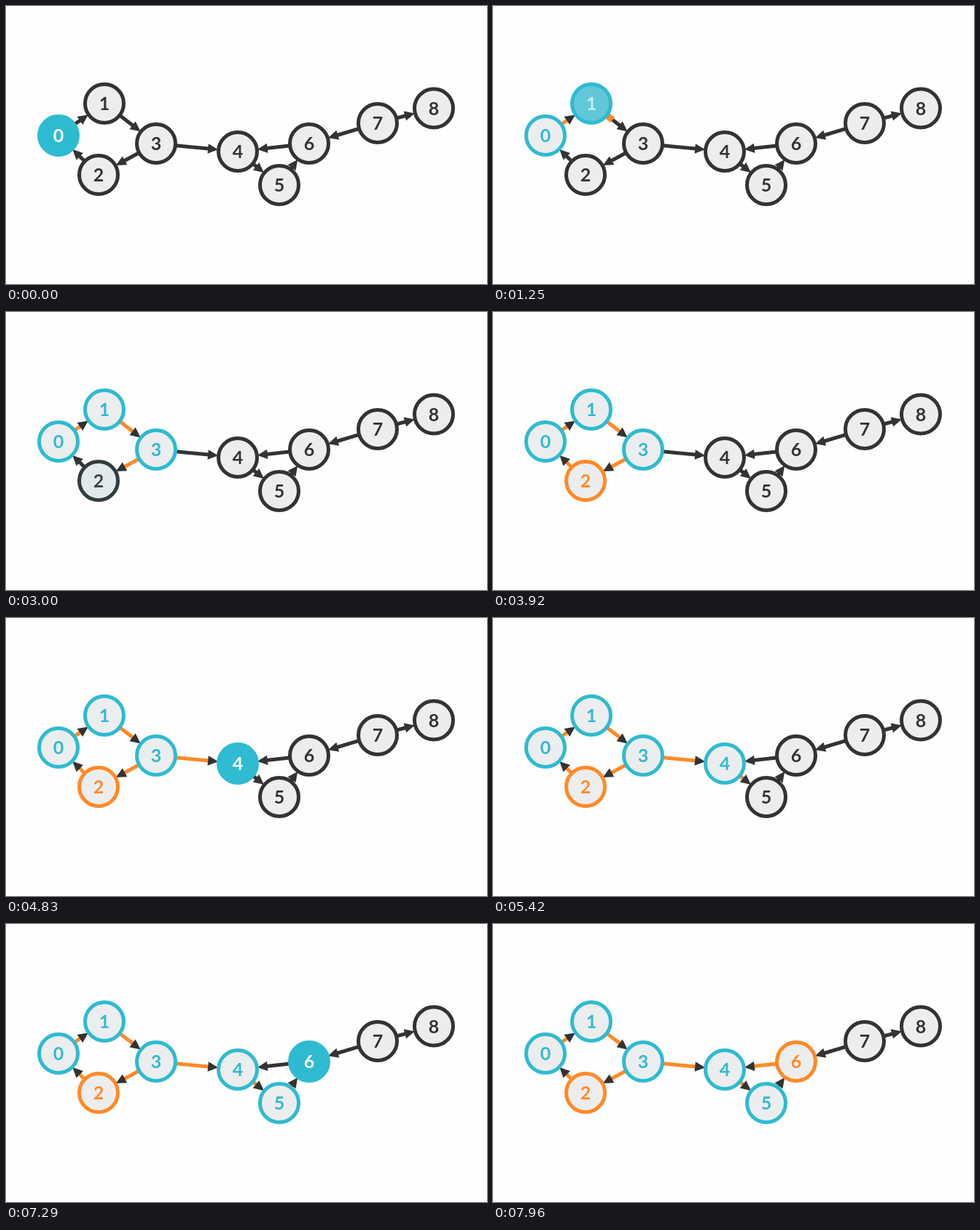
Animation, 660 px wide and 382 px high, one loop 8000 ms. Source, as an HTML page:

```html
<!DOCTYPE html>
<html lang="en">
<head>
<meta charset="utf-8">
<title>Depth-first search on a directed graph</title>
<style>
  html, body { margin: 0; width: 100%; height: 100%; overflow: hidden; background: #fefefe; }
  svg { display: block; width: 660px; height: 382px; }
  circle { stroke-width: 5; }
  text { font: 700 25px Lato, "Open Sans", sans-serif; text-anchor: middle; }
</style>
</head>
<body>
<svg id="stage" viewBox="0 0 660 382"></svg>
<script>
const LOOP = 8000, FADE = 300, RADIUS = 28;
const DARK = [51, 51, 51], ORANGE = [255, 138, 39], CYAN = [46, 187, 209];
const GREY = [236, 237, 238], WHITE = [255, 255, 255];

const STYLES = {
  idle:   { stroke: DARK,   fill: GREY, text: DARK },
  active: { stroke: CYAN,   fill: CYAN, text: WHITE },
  seen:   { stroke: CYAN,   fill: GREY, text: CYAN },
  done:   { stroke: ORANGE, fill: GREY, text: ORANGE }
};

const POINTS = [[72, 178], [135, 134], [127, 232], [206, 189], [318, 200],
                [375, 246], [416, 189], [510, 161], [587, 140.5]];
const LINKS = ['01', '13', '32', '20', '34', '45', '56', '64', '76', '78'];

// start time, vertex, its new style, edge followed at the same moment
const STEPS = [
  [30, 0, 'seen', '01'], [580, 1, 'active'],
  [1130, 1, 'seen', '13'], [1730, 3, 'active'],
  [2330, 3, 'seen', '32'], [2925, 2, 'active'],
  [3470, 2, 'done', '20'], [4015, 3, 'seen', '34'],
  [4560, 4, 'active'], [5110, 4, 'seen', '45'],
  [5670, 5, 'active'], [6230, 5, 'seen', '56'],
  [6800, 6, 'active'], [7370, 6, 'done', '64']
];

const stage = document.getElementById('stage');
const rgb = c => `rgb(${c.map(Math.round)})`;
const mix = (a, b, k) => a.map((v, i) => v + (b[i] - v) * k);
const ease = p => p < 0.5 ? 4 * p ** 3 : 1 - 4 * (1 - p) ** 3;
const progress = (time, start) => Math.min(1, Math.max(0, (time - start) / FADE));

function set(el, attrs) {
  for (const key in attrs) el.setAttribute(key, attrs[key]);
}

function add(tag, attrs) {
  const el = document.createElementNS('http://www.w3.org/2000/svg', tag);
  set(el, attrs);
  return stage.appendChild(el);
}

function makeEdge(id) {
  const [from, to] = [...id].map(n => POINTS[n]);
  const dx = to[0] - from[0], dy = to[1] - from[1];
  const length = Math.hypot(dx, dy), angle = Math.atan2(dy, dx) * 180 / Math.PI;
  const transform = `translate(${from}) rotate(${angle})`;
  const tip = length - RADIUS + 1;
  const line = add('path', { transform, d: `M20 0H${tip - 8}`, 'stroke-width': 5 });
  add('path', { transform, d: `M${tip} 0l-14 -6.7v13.4z`, fill: rgb(DARK) });
  const trace = add('path', { transform, stroke: rgb(ORANGE), 'stroke-width': 9 });
  const step = STEPS.find(s => s[3] === id);
  return { line, trace, span: length - 2 * RADIUS, start: step ? step[0] : Infinity };
}

function makeVertex([x, y], index) {
  const circle = add('circle', { cx: x, cy: y, r: 26.5 });
  const label = add('text', { x, y: y + 9 });
  label.textContent = index;
  return {
    circle, label,
    first: index ? 'idle' : 'active',
    steps: STEPS.filter(s => s[1] === index)
  };
}

const edges = LINKS.map(makeEdge);
const vertices = POINTS.map(makeVertex);

function drawEdge({ line, trace, span, start }, time) {
  const p = progress(time, start);
  const moving = p > 0 && p < 1;
  set(line, { stroke: rgb(p === 1 ? ORANGE : DARK) });
  set(trace, {
    d: `M${RADIUS - 2} 0H${RADIUS + span * ease(p)}`,
    visibility: moving ? 'visible' : 'hidden'
  });
}

function drawVertex({ circle, label, first, steps }, time) {
  let style = STYLES[first];
  for (const [start, , name] of steps) {
    const k = ease(progress(time, start)), next = STYLES[name], last = style;
    style = {};
    for (const key in next) style[key] = mix(last[key], next[key], k);
  }
  set(circle, { stroke: rgb(style.stroke), fill: rgb(style.fill) });
  set(label, { fill: rgb(style.text) });
}

const origin = performance.now();
function frame() {
  const time = (performance.now() - origin) % LOOP;
  edges.forEach(edge => drawEdge(edge, time));
  vertices.forEach(vertex => drawVertex(vertex, time));
  requestAnimationFrame(frame);
}
frame();
</script>
</body>
</html>
```
